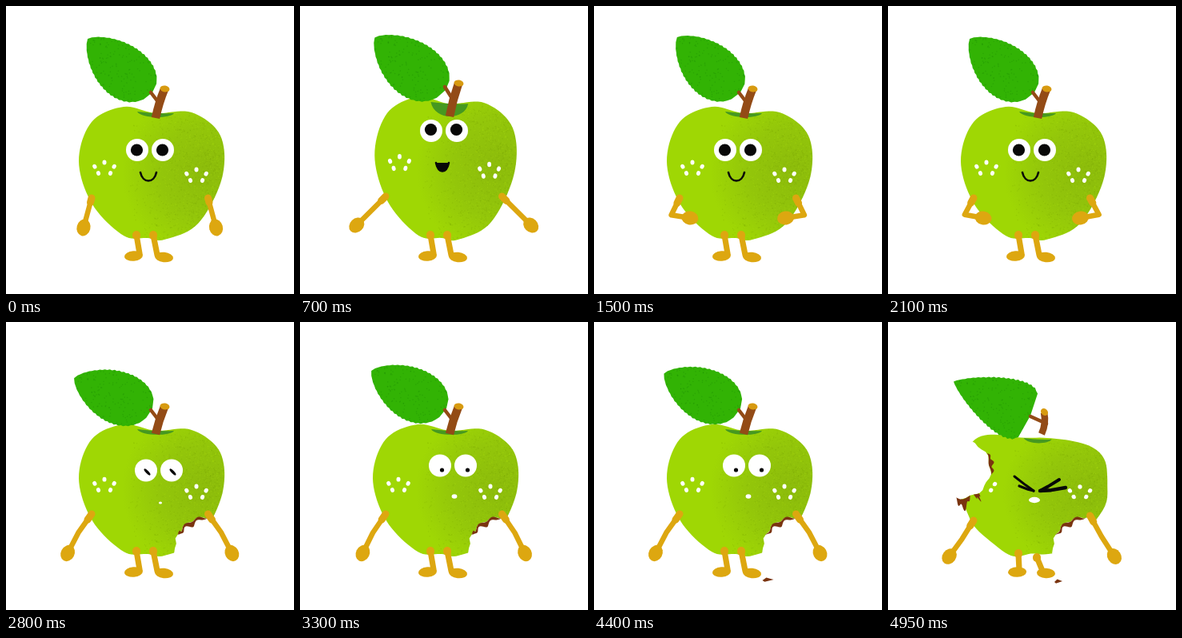
Animation, 360 px wide and 360 px high, one loop 5000 ms. Source, as an HTML page with a canvas:

```html
<!DOCTYPE html>
<html lang="en">
<head>
<meta charset="utf-8">
<title>Apple</title>
<style>
  html, body { margin: 0; width: 100%; height: 100%; overflow: hidden; background: #fff; }
  canvas { display: block; width: 360px; height: 360px; }
</style>
</head>
<body>
<canvas id="stage"></canvas>
<script>
const LOOP = 5000, STEP = 50, BITE1 = 2300, BITE2 = 4550, TAU = Math.PI * 2;
const LIMB = '#dda710', CRUST = '#7a3410', SKIN = '#9fd704', WOOD = '#934b16', INK = '#080808';

const canvas = document.getElementById('stage');
const ctx = canvas.getContext('2d');
const ratio = window.devicePixelRatio || 1;
canvas.width = canvas.height = 360 * ratio;
ctx.scale(ratio, ratio);

// Key points of the apple, clockwise from the dip backwards round the left side.
const apple = [[187,134], [147,126], [107,145], [91,194], [108,248], [147,287],
  [177,290], [198,292], [240,272], [270,215], [268,162], [232,133]];

// Left arm poses: hand x, hand y, elbow bend. The right arm is the mirror image.
const DOWN = [97, 277, 0], OUT = [70, 274, 0], HIPS = [119, 265, 19], SLUMP = [78, 289, 2];

const mix = (a, b, k) => a + (b - a) * k;
const blend = (p, q, k) => p.map((v, i) => mix(v, q[i], k));

function ramp(t, from, to) {
  const u = Math.max(0, Math.min(1, (t - from) / (to - from)));
  return u * u * (3 - 2 * u);
}

function seeded(seed) {
  return () => (seed = (seed * 16807) % 2147483647) / 2147483647;
}
const rnd = seeded(71);
const bodyGrain = Array.from({ length: 1800 }, () => [150 + 124 * Math.sqrt(rnd()), 122 + 170 * rnd(), rnd() < .5]);
const leafGrain = Array.from({ length: 220 }, () => [105 * rnd(), 70 * rnd() - 38]);

// All moods of the moment, each from 0 to 1 (sway from -1 to 1).
function moods(t) {
  const bitten = t >= BITE1, since = t - BITE1;
  return {
    t, bitten,
    sway: Math.sin(TAU * t / 840),
    tall: ramp(t, 550, 700) - ramp(t, 950, 1100),
    hurt: ramp(t, 2250, 2350) - ramp(t, 2500, 2750) + ramp(t, 4500, 4600),
    limp: ramp(t, 4500, 4650),
    recoil: bitten ? Math.exp(-since / 280) * Math.cos(TAU * since / 800) : 0
  };
}

function trace(points) {
  ctx.beginPath();
  points.forEach(p => ctx.lineTo(...p));
}

function fill(points, color) {
  trace(points);
  ctx.closePath();
  ctx.fillStyle = color;
  ctx.fill();
}

function line(points, width, color, cap = 'round') {
  trace(points);
  ctx.lineWidth = width;
  ctx.strokeStyle = color;
  ctx.lineCap = cap;
  ctx.lineJoin = 'round';
  ctx.stroke();
}

function oval(x, y, rx, ry, color, turn = 0) {
  ctx.beginPath();
  ctx.ellipse(x, y, rx, ry, turn, 0, TAU);
  ctx.fillStyle = color;
  ctx.fill();
}

// Closed Catmull-Rom curve through the points.
function smooth(points, n = 10) {
  const len = points.length;
  return points.flatMap((_, i) => Array.from({ length: n }, (_, j) => {
    const u = j / n;
    return [0, 1].map(d => {
      const [a, b, c, e] = [-1, 0, 1, 2].map(o => points[(i + o + len) % len][d]);
      return b + .5 * u * (c - a + u * (2 * a - 5 * b + 4 * c - e + u * (3 * b - a - 3 * c + e)));
    });
  }));
}
const outline = smooth(apple);

function drawBody({ tall, hurt, bitten }) {
  ctx.save();
  ctx.translate(182, 291);
  ctx.scale(1 - .025 * tall + .035 * hurt, 1 + .075 * tall - .07 * hurt - (bitten ? .012 : 0));
  ctx.translate(-182, -291);

  const shade = ctx.createRadialGradient(250, 208, 10, 250, 208, 105);
  shade.addColorStop(0, '#8dbd0b');
  shade.addColorStop(.5, '#93c60a');
  shade.addColorStop(1, SKIN);
  fill(outline.map(([x, y]) => [
    x + hurt * (Math.min(0, y - 190) * .1 + 2 * Math.sin(y * .09)),
    y + hurt * 2.5 * Math.sin(x * .09)
  ]), shade);

  ctx.save();
  ctx.clip();
  for (const [x, y, dark] of bodyGrain) {
    ctx.fillStyle = dark ? 'rgba(110,150,5,.2)' : 'rgba(175,225,20,.25)';
    ctx.fillRect(x, y, 1.2, 1.2);
  }
  ctx.restore();

  const depth = 9 + 13 * tall, wide = 23 + tall - 6 * hurt;
  ctx.beginPath();
  ctx.moveTo(187 - wide, 132);
  ctx.quadraticCurveTo(187, 135, 187 + wide, 134);
  ctx.bezierCurveTo(182 + wide, 132 + depth, 192 - wide, 132 + depth, 187 - wide, 132);
  ctx.fillStyle = '#469820';
  ctx.fill();

  // Two pentagons of freckles
  for (const [cx, cy] of [[123, 203], [238, 212]]) {
    for (let i = 0; i < 5; i++) {
      const a = TAU * (i / 5 - .25);
      oval(cx + 12.8 * Math.cos(a), cy - 6 * hurt + 7.5 * Math.sin(a), 2.5, 3, '#fff', .5 * Math.cos(a));
    }
  }
  ctx.restore();
}

// The leaf lies along its own x axis, from the stalk to the tip.
function drawLeaf({ sway, tall, limp, recoil, bitten }) {
  const size = 105, teeth = 36;
  const turn = 219.6 - 1.5 * sway - 4.4 * tall - (bitten ? 13.6 : 0) - 3 * limp + 30 * recoil;
  const edge = (u, width) => width * u ** mix(.5, .2, limp) * (1 - u) ** mix(.75, .85, limp);
  const side = (sign, width) => Array.from({ length: teeth + 1 }, (_, i) => {
    const u = i / teeth;
    return [u * size, sign * edge(u, width + (i % 2 ? 2.5 : 0))];
  });

  ctx.save();
  ctx.translate(183 - tall - 5 * limp, 108 - 3 * tall + 9 * limp);
  ctx.rotate(turn * TAU / 360);
  ctx.scale(1 + .05 * tall, 1 + .05 * tall);
  fill([...side(1, mix(68, 58, limp)), ...side(-1, mix(82, 62, limp)).reverse()], '#32b304');
  ctx.clip();
  for (const [x, y] of leafGrain) {
    ctx.fillStyle = 'rgba(25,130,5,.3)';
    ctx.fillRect(x, y, 1.3, 1.3);
  }
  ctx.restore();
}

function drawStem({ tall, hurt, bitten }) {
  const drop = bitten ? 2 : 0;
  const base = [187 + 5 * hurt, 140 - 2 * tall];
  const top = [198 - 3 * hurt, 104 - 7 * tall + 7 * hurt + drop];
  const fork = [191 + 7 * hurt, 121 - 4 * tall + 4 * hurt + drop];
  line([[181 - 3 * hurt, 108 - 7 * tall + 8 * hurt + drop], fork], 4.5, WOOD);
  ctx.beginPath();
  ctx.moveTo(...base);
  ctx.quadraticCurveTo(...fork, ...top);
  ctx.lineWidth = 10.5 - 2 * hurt;
  ctx.lineCap = 'butt';
  ctx.strokeStyle = WOOD;
  ctx.stroke();
  oval(top[0] + .5, top[1] - .5, 6 - hurt, 4, '#d79a10', .2 + .6 * hurt);
}

// A bite is a rippled white disc with crust along parts of its rim (angles in turns).
function drawBite(cx, cy, r, crust, ripples) {
  const rim = (a, extra = 0) => {
    const d = r + extra + 1.6 * Math.sin(a * TAU * ripples);
    return [cx + d * Math.cos(a * TAU), cy + d * Math.sin(a * TAU)];
  };
  const arc = (from, to, thick) => Array.from({ length: 41 }, (_, i) => {
    const u = i / 40;
    return rim(mix(from, to, u), thick * Math.sin(Math.PI * u) * (1 + .4 * Math.sin(u * 17)));
  });
  fill(arc(0, 1, 0), '#fff');
  for (const [from, to, thick] of crust) {
    fill([...arc(from, to, 0), ...arc(from, to, thick).reverse()], CRUST);
  }
}

function drawBites({ t, hurt, limp, bitten }) {
  if (!bitten) return;
  drawBite(250 - 5 * hurt, 283, 39, [[-.43, -.24, -5]], 13);
  if (t >= BITE2) drawBite(92, 184, 36, [[-.09, .03, 5], [.15, .18, 8], [.2, .28, 11]], 9);

  const fall = Math.max(0, t - 3400) / 250;
  const x = 217.5 - 4.5 * limp, y = Math.min(322 + 2 * limp, 263 + 59 * fall * fall);
  const w = fall ? 7 - 2 * limp : 2.5;
  fill([[x - w, y + 1], [x - w * .3, y - 2.5], [x + w, y], [x - w * .6, y + 2.8]], CRUST);
}

function drawWince() {
  for (const [side, dx, dy, width] of [[-1, 28, 18, 3], [-1, 22, 6, 3.2], [1, 28, 14, 4], [1, 36, 4, 4.4]]) {
    line([[186 + side * dx, 211 - dy], [186 + side * dx / 2, 212 - dy / 2.2], [186 + side * 4, 211]], width, INK);
  }
  oval(183, 222.5, 7, 3.7, '#fff');
}

function drawStare({ t }) {
  const squint = 1 - ramp(t, 2800, 2950);
  for (const x of [175, 207]) {
    const y = 179.5 + 6 * squint;
    oval(x, y, 14, 14, '#fff');
    if (squint > .5) oval(x + 1.5, y + 2, 5.4, 1.7, INK, .8);
    else oval(x + 2.5, y + 5.5, 2.6, 2.6, INK);
  }
  const r = mix(3.4, 2, squint);
  oval(193, 218 + 8 * squint, r, r * .8, '#fff');
}

function drawSmile({ tall }) {
  const y = 180 - 24 * tall, m = 208 - 12 * tall, open = tall > .4;
  for (const x of [164, 196]) {
    oval(x, y, 14, 14, '#fff');
    oval(x - .5, y - 1.5 * tall, 7.6, 7.6, INK);
  }
  const half = open ? 8 : 10;
  ctx.beginPath();
  ctx.moveTo(178 - half, m);
  ctx.bezierCurveTo(181 - half, m + 14, 175 + half, m + 14, 178 + half, m);
  ctx.lineWidth = 2.6;
  ctx.lineCap = 'round';
  ctx.strokeStyle = ctx.fillStyle = INK;
  if (open) ctx.fill();
  ctx.stroke();
}

function drawFace(m) {
  const wince = m.bitten && m.t < 2750 || m.t >= BITE2;
  if (wince) drawWince();
  else if (m.bitten) drawStare(m);
  else drawSmile(m);
}

function drawArms({ t, sway, tall, hurt }) {
  let pose = blend(DOWN, OUT, ramp(t, 550, 700));
  pose = blend(pose, HIPS, ramp(t, 950, 1100));
  pose = blend(pose, SLUMP, ramp(t, 2250, 2350));
  const hx = pose[0] - sway - 2 * hurt, hy = pose[1] + 4 * hurt, bend = pose[2] - 3 * hurt;

  for (const mirror of [1, -1]) {
    const sx = 107, sy = 240 - 2 * tall + (5 + 3 * mirror) * hurt;
    const len = Math.hypot(hx - sx, hy - sy);
    const ex = (sx + hx) / 2 - bend * (hy - sy) / len;
    const ey = (sy + hy) / 2 + bend * (hx - sx) / len;
    ctx.save();
    if (mirror < 0) ctx.translate(359.5, 0);
    ctx.scale(mirror, 1);
    line([[sx, sy], [ex, ey], [hx, hy]], 6.5, LIMB);
    line([[sx, sy], [mix(sx, ex, .3), mix(sy, ey, .3)]], 9, LIMB);
    oval(hx, hy, 10.5, 8.5, LIMB, Math.atan2(hy - ey, hx - ex));
    ctx.restore();
  }
}

function drawLegs({ hurt }) {
  const leg = (x, y, ankle, foot, sole) => {
    line([[x, y], [x, y + 1]], 10, LIMB);
    line([[x, y], [ankle, sole - 3]], 7.2, LIMB);
    oval(foot, sole, 11.5, 6.2, LIMB, (foot - ankle) * .012);
  };
  leg(163, 286 + 3 * hurt, 167 - 3 * hurt, 159.5 + 2 * hurt, 312.5);
  leg(184 + 2 * hurt, 286 + 8 * hurt, 189 + 4 * hurt, 197.5, 314);
}

function draw(t) {
  const m = moods(t);
  ctx.fillStyle = '#fff';
  ctx.fillRect(0, 0, 360, 360);
  for (const part of [drawBody, drawLeaf, drawStem, drawBites, drawFace, drawLegs, drawArms]) part(m);
}

const start = performance.now();
function tick() {
  const t = (performance.now() - start) % LOOP;
  draw(Math.floor(t / STEP) * STEP);
  requestAnimationFrame(tick);
}
tick();
</script>
</body>
</html>
```
